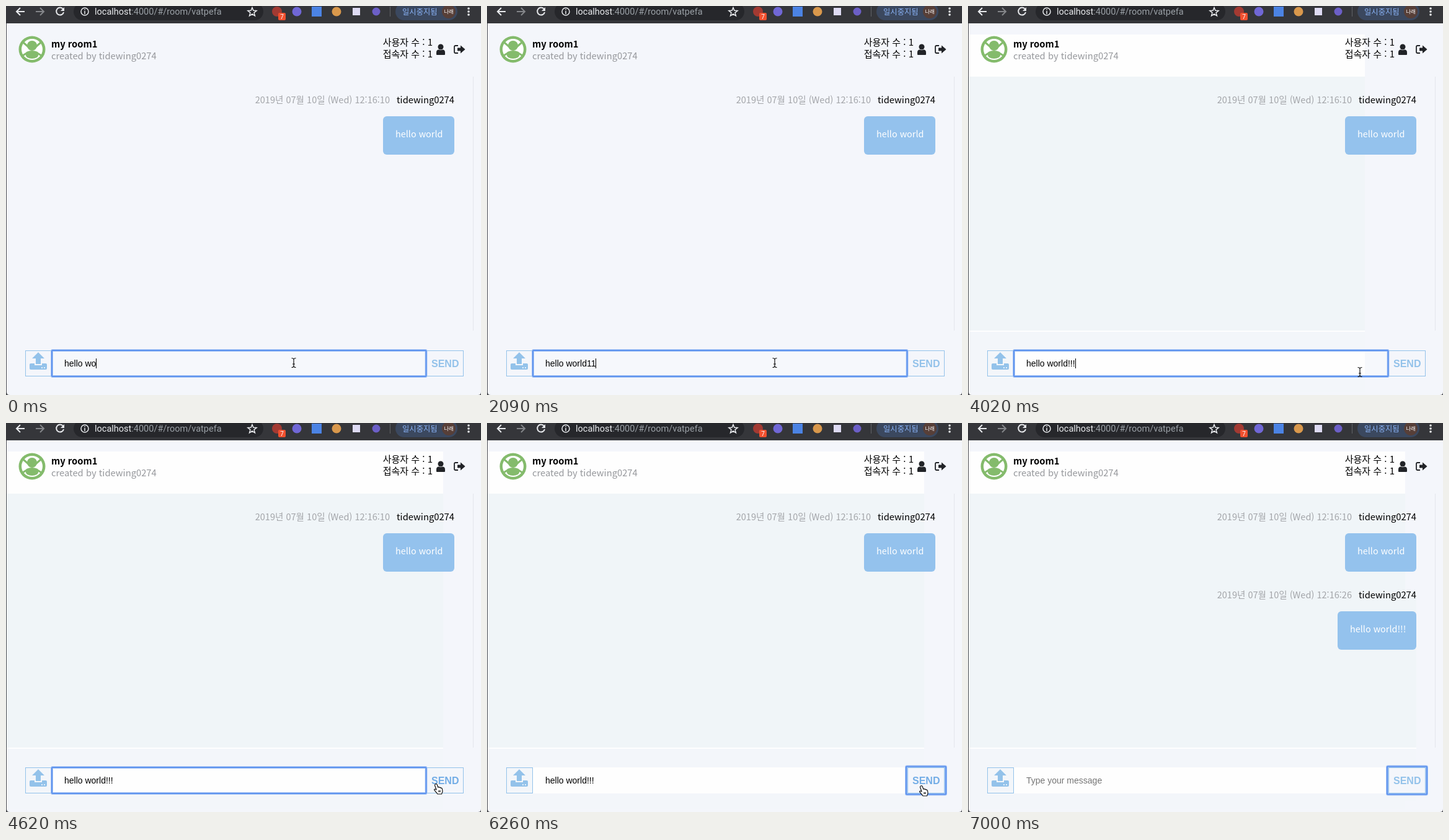
Recreate the animation shown at these times as an HTML page. Size 766 px wide and 628 px high, loop 7.45 s.

```html
<!DOCTYPE html>
<html lang="ko">
<head>
<meta charset="utf-8">
<style>
html, body { margin: 0; width: 100%; height: 100%; overflow: hidden; background: #4b4c50; }
svg { display: block; }
text { font: 14.75px "Noto Sans CJK KR", "Noto Sans CJK", sans-serif; white-space: pre; }
.url { font: 14.5px Roboto, sans-serif; }
.input { font: 14px "Liberation Sans", Arial, sans-serif; }
.send { font: bold 16px "Liberation Sans", Arial, sans-serif; }
.date { fill: #a3a5a9; text-anchor: end; font-size: 14.55px; }
.end { text-anchor: end; font-weight: 500; }
.count { text-anchor: end; font-size: 15px; }
.said { fill: #fff; font-size: 14.4px; }
.bubble { fill: #94c2ed; }
.line { fill: none; stroke: #93c2ea; }
.focus { fill: none; stroke: #5f94ee; stroke-width: 2.2; }
.glow { fill: none; stroke: #a9c6f6; stroke-width: 3.8; }
.icon { fill: none; stroke: #e8eaed; stroke-width: 2; }
.body { fill: #f0f5f8; }
.foot { fill: #f3f6fa; }
.white { fill: #fefefe; }
</style>
</head>
<body>
<svg width="766" height="628" viewBox="0 0 766 628">
  <path fill="#f4f6fb" d="M1 28H766V623Q766 628 761 628H6Q1 628 1 623Z"/>

  <!-- repainted part of the page -->
  <g id="paint">
    <rect class="white" x="1" y="46" height="68"/>
    <rect class="body" x="1" y="114" height="410"/>
    <rect class="white" x="1" y="524" height="2"/>
    <rect class="foot" x="1" y="526" height="97"/>
  </g>
  <g id="latePaint">
    <rect class="body" x="705" y="271" width="18" height="253"/>
    <rect class="white" x="705" y="524" width="18" height="2"/>
    <rect class="foot" x="705" y="526" width="18" height="85"/>
  </g>
  <path d="M753.5 114V524" stroke="#e3e6ec"/>

  <!-- browser toolbar -->
  <rect width="766" height="28" fill="#35363a"/>
  <rect x="109" y="-5" width="306" height="28" rx="14" fill="#26272b"/>
  <path class="icon" d="M30 9H18M23 3L17 9L23 15"/>
  <path class="icon" style="stroke:#84868a" d="M48 9H60M55 3L61 9L55 15"/>
  <path class="icon" d="M92 5A6 6 0 1 0 93 10"/>
  <path fill="#e8eaed" d="M94 2V8H88Z"/>
  <circle class="icon" cx="127" cy="9" r="6" style="stroke-width:1.5"/>
  <path class="icon" style="stroke-width:1.5" d="M127 8V13M127 5V6.5"/>
  <text class="url" x="143" y="14" fill="#e8eaed">localhost<tspan fill="#9aa0a6">:4000/#/room/vatpefa</tspan></text>
  <path class="icon" style="stroke-width:1.5" d="M397 2.5L398.9 7.3L404 7.6L400 10.8L401.4 15.8L397 13L392.6 15.8L394 10.8L390 7.6L395.1 7.3Z"/>
  <circle cx="437" cy="9" r="8" fill="#a33a32"/>
  <rect x="439" y="11" width="12" height="12" rx="2" fill="#f1502f"/>
  <text class="url" x="445" y="20.5" text-anchor="middle" fill="#fff" style="font-size:10px">7</text>
  <circle cx="469" cy="9" r="7.5" fill="#7067d6"/>
  <rect x="493" y="1" width="16" height="16" fill="#4b83e4"/>
  <circle cx="533" cy="9" r="7.5" fill="#d9984c"/>
  <rect x="559" y="3" width="12" height="12" fill="#dedbf3"/>
  <circle cx="597" cy="9" r="6.5" fill="#6c5fc7"/>
  <path d="M619.5 1V17" stroke="#606266"/>
  <rect x="628" y="-5" width="100" height="28" rx="14" fill="#3b485f"/>
  <text x="639" y="13.5" fill="#8ab4f8" style="font-size:12.3px">일시중지됨</text>
  <circle cx="714" cy="9" r="11" fill="#573f38"/>
  <text x="714" y="12.2" text-anchor="middle" fill="#fff" style="font-size:8.5px">나래</text>
  <g fill="#e8eaed"><circle cx="746" cy="4" r="1.8"/><circle cx="746" cy="9" r="1.8"/><circle cx="746" cy="14" r="1.8"/></g>

  <!-- room header -->
  <circle cx="42" cy="70" r="21.5" fill="#84bb6c"/>
  <circle cx="42" cy="70" r="17" fill="#fff"/>
  <g fill="#84bb6c">
    <circle cx="42" cy="64" r="8"/>
    <path d="M33 74Q42 70 51 74Q54 80 50 83Q42 87 34 83Q30 80 33 74Z"/>
    <path d="M28 59L36 66M56 59L48 66M27 80L35 75M57 80L49 75" stroke="#84bb6c" stroke-width="3"/>
  </g>
  <text x="73" y="67" style="font-weight:bold">my room1</text>
  <text x="73" y="86" fill="#96989c">created by tidewing0274</text>
  <text class="count" x="688" y="64">사용자 수 : 1</text>
  <text class="count" x="688" y="83">접속자 수 : 1</text>
  <g fill="#212327">
    <circle cx="701" cy="66" r="4.5"/>
    <path d="M694 78V75Q694 70.5 698 70.5Q701 72 704 70.5Q708 70.5 708 75V78Q708 79 707 79H695Q694 79 694 78Z"/>
    <path d="M728 67.5H733V63.5L740.5 70L733 76.5V72.5H728Z"/>
  </g>
  <path d="M729 64H725Q723 64 723 66V74Q723 76 725 76H729" fill="none" stroke="#212327" stroke-width="1.8"/>

  <!-- messages -->
  <text class="date" x="619" y="157">2019년 07월 10일 (Wed) 12:16:10</text>
  <text class="end" x="723" y="157">tidewing0274</text>
  <rect class="bubble" x="608" y="178" width="115" height="62" rx="6"/>
  <text class="said" x="628" y="212">hello world</text>
  <g id="reply">
    <text class="date" x="619" y="283">2019년 07월 10일 (Wed) 12:16:26</text>
    <text class="end" x="723" y="283">tidewing0274</text>
    <rect class="bubble" x="596" y="304" width="127" height="62" rx="6"/>
    <text class="said" x="616" y="338">hello world!!!</text>
  </g>

  <!-- message form -->
  <rect class="line" x="31.5" y="556.5" width="42" height="41"/>
  <path fill="#93c2ea" d="M52 559L62 569H56V578H48V569H42ZM40 577H46V580H58V577H64Q66 577 66 579V585Q66 587 64 587H40Q38 587 38 585V579Q38 577 40 577Z"/>
  <path d="M57 584H59M61 584H63" stroke="#fff" stroke-width="1.6"/>
  <rect x="74" y="556" width="604" height="42" fill="#f6f8fc"/>
  <rect class="white" id="inputPaint" x="74" y="556" height="42"/>
  <rect class="line" x="677.5" y="556.5" width="60" height="41"/>
  <g id="inputFocus">
    <rect class="glow" x="74" y="556" width="603.5" height="42" rx="1"/>
    <rect class="focus" x="74" y="556" width="603.5" height="42" rx="1"/>
  </g>
  <g id="sendFocus">
    <rect x="676" y="554" width="64" height="46" fill="#f4f6fb"/>
    <rect class="glow" x="676" y="554.5" width="64" height="45" rx="1"/>
    <rect class="focus" x="676" y="554.5" width="64" height="45" rx="1"/>
    <rect class="line" x="678.5" y="556.5" width="59" height="41"/>
  </g>
  <text class="input" id="typed" x="94" y="582"></text>
  <rect id="caret" y="569" width="1" height="16"/>
  <text class="send" id="send" x="686" y="583">SEND</text>

  <path id="beam" d="M-3.5 -7.5Q0 -7.5 0 -5V5Q0 7.5 -3.5 7.5M3.5 -7.5Q0 -7.5 0 -5V5Q0 7.5 3.5 7.5M-2 2H2" fill="none" stroke="#111" stroke-width="1.2"/>
  <path id="hand" d="M2.5 1Q4.5 0 5.3 2L6.7 6Q8.2 5 9 6.5Q10.6 5.8 11.2 7.3Q13 6.8 13.5 8.8L14 13L12.5 17H6L1 11Q0 9.5 1.5 9Q3 9 4.2 10.5L1.5 3Q1.2 1.7 2.5 1ZM8 11V14M10 11V14" fill="#fff" stroke="#111" stroke-width="1.2"/>
</svg>
<script>
const LOOP = 7450, CLICK = 6260, SENT = 6550;
const $ = id => document.getElementById(id);
const show = (id, on) => $(id).style.display = on ? '' : 'none';
// latest entry whose time has passed
const at = (track, t) => track.filter(k => k[0] <= t).pop();

const typing = [
  [0, 'wo'], [150, 'wor'], [300, 'world'], [750, 'world1'], [900, 'world11'], [1050, 'world111'],
  [2090, 'world11'], [2240, 'world1'], [2390, 'world'], [2530, 'world!'], [2830, 'world!!'], [2980, 'world!!!']
];
const blink = [[0, 1], [1640, 0], [2090, 1], [3570, 0], [4020, 1], [4620, 0], [5070, 1], [5510, 0]];
const paint = [[0, 1], [3130, 170], [3570, 470], [3720, 510], [3870, 570], [4020, 640], [4170, 690], [4320, 705]];
const pointer = [
  [0, 464, 576, 'beam'], [3570, 472, 577, 'beam'], [3720, 507, 581, 'beam'], [3870, 566, 587, 'beam'],
  [4020, 632, 591, 'beam'], [4170, 682, 586, 'hand'], [4320, 692, 585, 'hand'],
  [4620, 690, 582, 'hand'], [4770, 690, 586, 'hand'], [4920, 691, 591, 'hand'], [5070, 692, 593, 'hand'],
  [5220, 692, 587, 'hand'], [5360, 690, 578, 'hand'], [5510, 688, 569, 'hand'], [5660, 687, 565, 'hand'],
  [5810, 689, 570, 'hand'], [5960, 693, 578, 'hand'], [6110, 696, 584, 'hand'], [6260, 697, 585, 'hand'],
  [6700, 697, 588, 'hand'], [6850, 697, 590, 'hand'], [7000, 0, 0, '']
];

function draw(t) {
  const typed = $('typed'), sent = t >= SENT, focused = t < CLICK;
  typed.textContent = sent ? 'Type your message' : 'hello ' + at(typing, t)[1];
  typed.setAttribute('fill', sent ? '#757575' : '#000');
  show('caret', focused && at(blink, t)[1]);
  $('caret').setAttribute('x', Math.round(94 + typed.getComputedTextLength()));

  const edge = at(paint, t)[1];
  for (const strip of $('paint').children) strip.setAttribute('width', edge - 1);
  $('inputPaint').setAttribute('width', Math.max(0, Math.min(edge, 678) - 74));

  show('inputFocus', focused);
  show('sendFocus', !focused);
  show('reply', sent);
  show('latePaint', sent);

  const [, x, y, kind] = at(pointer, t);
  for (const id of ['beam', 'hand']) {
    show(id, id === kind);
    $(id).setAttribute('transform', `translate(${x} ${y})`);
  }
  const hover = kind === 'hand' && !(t >= 5510 && t < 5960);
  $('send').setAttribute('fill', hover ? '#73ade6' : '#93c2ea');
}

function tick(now) {
  draw(now % LOOP);
  requestAnimationFrame(tick);
}
draw(0);
requestAnimationFrame(tick);
</script>
</body>
</html>
```
